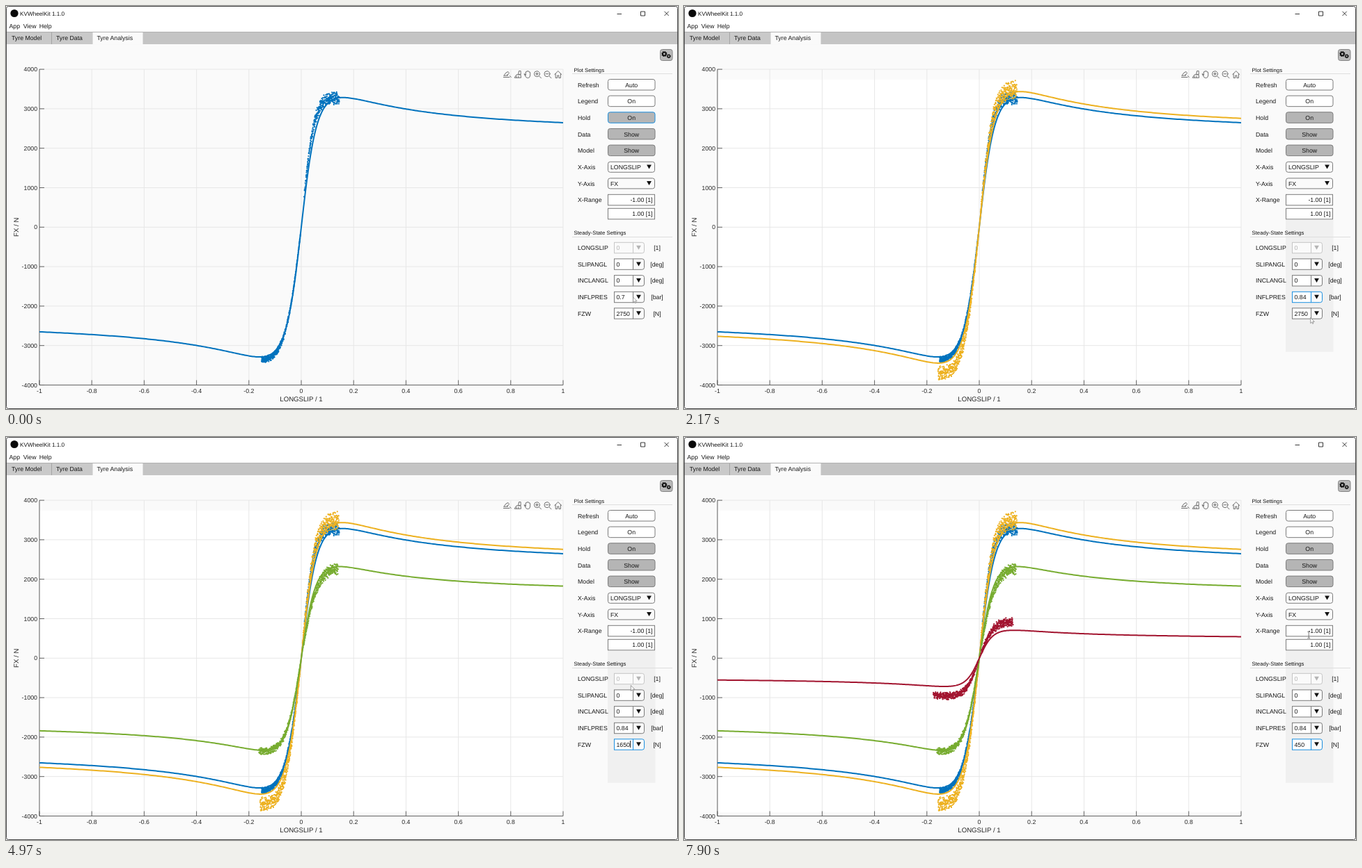
An HTML page that plays this animation: 965x580 px, repeating every 8000 ms.

```html
<!DOCTYPE html>
<html lang="en">
<head>
<meta charset="utf-8">
<title>Tyre Analysis</title>
<style>
html, body { margin: 0; width: 100%; height: 100%; overflow: hidden; background: #fafafa; }
svg { display: block; width: 965px; height: 580px; }
text { font: 8.75px "Liberation Sans", Arial, sans-serif; fill: #161616; text-rendering: geometricPrecision; white-space: pre; }
.mid { text-anchor: middle; }
.end { text-anchor: end; }
.axis { font-size: 9.63px; }
.head { font-size: 7.75px; }
.tick { fill: #262626; }
.off { fill: #b4b4b4; }
.line { fill: none; stroke-width: 2; stroke-linejoin: round; }
.dots { fill: none; stroke-width: 2.2; stroke-linecap: round; }
.icon { fill: none; stroke: #6e6e6e; stroke-width: 1; stroke-linejoin: round; stroke-linecap: round; }
.box { stroke: #7b7b7b; stroke-width: 1; fill: #fff; }
.box.on { fill: #b5b5b5; }
.box.soft { fill: #fafafa; }
.box.dim { stroke: #c6c6c6; fill: #fafafa; }
.box.focus { stroke: #1a8fe0; }
</style>
</head>
<body>
<svg id="stage" viewBox="0 0 965 580" xmlns="http://www.w3.org/2000/svg"></svg>
<script>
const LOOP = 8000;
const ACCENT = '#1a8fe0';

// ---------- markup helpers ----------
const text = (x, y, s, cls = '', more = '') =>
  `<text x="${x}" y="${y + 3.1}" class="${cls}" ${more}>${s}</text>`;
const rect = (x, y, w, h, more = '') =>
  `<rect x="${x}" y="${y}" width="${w}" height="${h}" ${more}/>`;
const path = (d, more = '') => `<path d="${d}" ${more}/>`;
const hair = (x1, y1, x2, y2, c) => path(`M${x1} ${y1}L${x2} ${y2}`, `stroke="${c}"`);
const arrow = (x, y, c = '#111') => path(`M${x - 3.4} ${y - 3}h6.8l-3.4 6z`, `fill="${c}"`);

// ---------- window frame ----------
function chrome() {
  return rect(0, 0, 965, 37.5, 'fill="#fff"')
    + `<circle cx="12" cy="10.5" r="5.6" fill="#0a0a0a"/>`
    + text(20, 11, 'KVWheelKit 1.1.0', '', 'style="font-size:8.2px"')
    + path('M877.5 11.5h6.5M911.5 8h6v6h-6zM945.5 7.8l6.2 6.2M951.7 7.8l-6.2 6.2', 'fill="none" stroke="#222" stroke-width=".9"')
    + text(4.5, 29.3, 'App') + text(24.7, 29.3, 'View') + text(47.7, 29.3, 'Help')
    + rect(0, 37.5, 965, 17.5, 'fill="#c4c4c4"')
    + rect(1, 38.5, 123, 16.5, 'fill="#c9c9c9"')
    + hair(0, 37.5, 965, 37.5, '#b2b2b2') + hair(65.5, 38, 65.5, 55, '#a4a4a4')
    + rect(124.5, 38, 72, 17.5, 'fill="#fafafa"')
    + text(8, 46, 'Tyre Model') + text(72, 46, 'Tyre Data') + text(130.5, 46, 'Tyre Analysis');
}

const gear = (x, y, r) =>
  `<circle cx="${x}" cy="${y}" r="${r}" fill="none" stroke="#111" stroke-width="${r * 0.8}"/>`
  + `<circle cx="${x}" cy="${y}" r="${r * 1.45}" fill="none" stroke="#111" stroke-width="${r * 0.5}" stroke-dasharray="${r * 0.57}"/>`;

function toolbar() {
  const lens = x => `<circle cx="${x}" cy="97.7" r="4"/><path d="M${x + 3} 100.8l3 3M${x - 2} 97.7h4"/>`;
  return `<g class="icon">
    <path d="M714.5 102.5h8.5M715 100l3-4 3-1.5 1.5 2-2.5 3.2zM720 98.5v2M723.5 100.5l1.8 2"/>
    <path d="M737 93.5h2.2v5h-3.2zM733.5 98.8h5.5l.6 4.4h-9zM733 101v2M736 101v2"/>
    <path d="M746.3 99.5v-4.6q.9-1 1.6 0v-1q.9-1 1.6 0v.3q.9-1 1.6 0v1q1-.8 1.6.2v4.6q-.4 3.6-3.2 3.6-2.6 0-3.6-2.5l-1.9-3.3q.6-1.2 2.3 1.7z"/>
    ${lens(762.5)}<path d="M762.5 95.7v4"/>
    ${lens(777)}
    <path d="M787.7 98.6l5.1-5 5.1 5M789.2 97.5v6h2.5v-3.5h2.2v3.5h2.5v-6"/>
  </g>`
    + rect(939.5, 62.5, 17.5, 16, 'rx="3" fill="#b9b9b9" stroke="#858585"')
    + gear(945.3, 69, 2.4) + gear(951.7, 72.2, 1.8);
}

// ---------- plot ----------
const px = v => 424 + 376 * v;
const py = v => 318.3 - 0.0568 * v;

function axes() {
  let s = rect(48, 106, 752, 434, 'id="sheet" fill="#fff"'), ticks = '';
  for (let i = -5; i <= 5; i++) {
    const x = px(i / 5);
    s += hair(x, 91, x, 545.5, '#e7e7e7') + text(x, 554.3, i / 5, 'mid tick');
    ticks += `M${x} 545.5v-7`;
  }
  for (let v = -4000; v <= 4000; v += 1000) {
    const y = py(v);
    s += hair(48, y, 800, y, '#e7e7e7') + text(45, y, v, 'end tick');
    ticks += `M48 ${y}h7`;
  }
  return s + path(`M48 91V545.5H800${ticks}`, 'fill="none" stroke="#555" stroke-width=".9"')
    + text(424, 566.3, 'LONGSLIP / 1', 'mid axis tick')
    + text(0, 0, 'FX / N', 'mid axis tick', 'transform="translate(15 318.3) rotate(-90)"');
}

// Magic formula: peak D, stiffness B, shape C, curvature E
function tyre(x, D, B, C, E = 0) {
  const z = B * x;
  return D * Math.sin(C * Math.atan(z - E * (z - Math.atan(z))));
}

function random(seed) {
  return () => (seed = (seed * 16807) % 2147483647) / 2147483647;
}

function curve({ color, D, B, C, shift }) {
  let d = '';
  for (let i = 0; i <= 400; i++) {
    const x = Math.sign(i - 200) * ((i - 200) / 200) ** 2;
    d += `${i ? 'L' : 'M'}${px(x).toFixed(2)} ${py(tyre(x, D, B, C, 0.2) + shift).toFixed(2)}`;
  }
  return path(d, `class="line" stroke="${color}"`);
}

// One measured sweep: from, to, peak, stiffness, spread
function sweep(color, [from, to, D, B, spread], rnd) {
  const n = Math.round(Math.abs(to - from) * 2600);
  let d = '';
  for (let i = 0; i < n; i++) {
    const x = from + (to - from) * i / n + (rnd() - 0.5) * 0.003;
    const grow = Math.min(1, 0.35 + Math.abs(x) / 0.09);
    const noise = spread * grow * (0.5 * Math.sin(i * 0.62) + rnd() - 0.5);
    d += `M${px(x).toFixed(1)} ${py(tyre(x, D, B, 1.5) + noise).toFixed(1)}h0`;
  }
  return path(d, `class="dots" stroke="${color}"`);
}

const runs = [
  { at: 0, color: '#0072bd', D: 3286, B: 11.85, C: 1.5, shift: -2,
    data: [[0.012, 0.145, 3270, 14.5, 165], [-0.152, -0.003, 3360, 11.2, 85]] },
  { at: 1720, color: '#edb120', D: 3440, B: 12, C: 1.503, shift: -4,
    data: [[0.004, 0.143, 3470, 13.5, 250], [-0.157, -0.003, 3700, 11.8, 190]] },
  { at: 4150, color: '#77ac30', D: 2328, B: 12.54, C: 1.516, shift: -7,
    data: [[0.008, 0.141, 2270, 11.3, 150], [-0.161, -0.004, 2355, 12, 95]] },
  { at: 7600, color: '#a2142f', D: 712, B: 13.57, C: 1.527, shift: -5,
    data: [[0.008, 0.128, 915, 13.3, 120], [-0.175, -0.004, 955, 14, 95]] }
];

const plots = () => runs.map((r, i) => {
  const rnd = random(91 + i * 577);
  return `<g id="run${i}">${r.data.map(d => sweep(r.color, d, rnd)).join('')}${curve(r)}</g>`;
}).join('');

// ---------- side panel ----------
const row = i => 113.5 + i * 23.65;

function button(i, label, caption, on, id = '') {
  return text(821, row(i), label)
    + rect(864.5, row(i) - 8, 67.5, 15.5, `rx="3" class="box${on ? ' on' : ''}" ${id && `id="${id}"`}`)
    + text(898.2, row(i), caption, 'mid');
}

function choice(i, label, value) {
  return text(821, row(i), label)
    + rect(864.5, row(i) - 7.5, 67, 15, 'rx="3" class="box soft"')
    + text(868, row(i), value) + arrow(923.5, row(i) - 0.3);
}

const field = (y, value) => rect(864.5, y - 8, 67, 15.5, 'class="box"') + text(928.5, y, value, 'end');

function combo(y, label, value, unit, id, dim) {
  const cls = dim ? 'box dim' : 'box';
  return text(821, y, label)
    + `<g id="${id}" class="${cls}" style="fill:none">`
    + rect(873.5, y - 7.7, 27, 15.4, `fill="${dim ? '#fafafa' : '#fff'}"`)
    + path(`M900.5 ${y - 7.7}h13a3 3 0 0 1 3 3v9.4a3 3 0 0 1 -3 3h-13z`, 'fill="#fafafa"')
    + '</g>'
    + text(876.5, y, value, dim ? 'off' : '', `id="${id}Value"`)
    + arrow(908.5, y - 0.2, dim ? '#b4b4b4' : '#111')
    + text(935, y, unit, 'mid');
}

function panel() {
  return rect(864, 308, 68.5, 189.7, 'id="shade" fill="#f0f0f0"')
    + text(815.5, 91.8, 'Plot Settings', 'head') + hair(813, 97.5, 957, 97.5, '#dedede')
    + button(0, 'Refresh', 'Auto') + button(1, 'Legend', 'On')
    + button(2, 'Hold', 'On', true, 'hold')
    + button(3, 'Data', 'Show', true) + button(4, 'Model', 'Show', true)
    + choice(5, 'X-Axis', 'LONGSLIP') + choice(6, 'Y-Axis', 'FX')
    + text(821, 278.8, 'X-Range') + field(279.3, '-1.00 [1]') + field(299.3, '1.00 [1]')
    + text(815.5, 326, 'Steady-State Settings', 'head') + hair(813, 332.5, 957, 332.5, '#dedede')
    + combo(348, 'LONGSLIP', '0', '[1]', 'slip', true)
    + combo(371.6, 'SLIPANGL', '0', '[deg]', 'angle')
    + combo(395.3, 'INCLANGL', '0', '[deg]', 'incline')
    + combo(419, 'INFLPRES', '0.7', '[bar]', 'pres')
    + combo(442.5, 'FZW', '2750', '[N]', 'load')
    + path('', 'id="caret" stroke="#111" stroke-width=".9"');
}

// ---------- drop-down lists ----------
const PITCH = 17.35;
const lists = {
  pres: { top: 428, items: ['0.7', '0.84', '0.97', '0.98'] },
  load: { top: 277.3, items: [450, 500, 550, 1100, 1650, 2150, 2200, 2700, 2750] }
};

function popup(id) {
  const { top, items } = lists[id];
  return `<g id="${id}List">`
    + rect(873.5, top, 43, items.length * PITCH, 'fill="#fff" stroke="#8a8a8a"')
    + rect(874, top, 42, PITCH, `id="${id}Pick" fill="#a5dbff"`)
    + rect(874, top, 42, PITCH - 0.6, `id="${id}Hover" fill="#dcf0fd" stroke="${ACCENT}"`)
    + items.map((v, i) => text(878, top + PITCH * (i + 0.5), v)).join('') + '</g>';
}

const pointers =
  path('M0 0V8L1.9 6.2 3 8.7 4.2 8.2 3.1 5.7H5.6Z', 'id="mouse" fill="#fff" stroke="#777" stroke-width=".7"')
  + path('M895.3 280.3h1.2l.7.5.7-.5h1.2M895.3 289.7h1.2l.7-.5.7.5h1.2M897.2 280.8v8.4', 'id="beam" fill="none" stroke="#555" stroke-width=".8"');

const stage = document.getElementById('stage');
stage.innerHTML = rect(0, 0, 965, 580, 'fill="#fafafa"') + chrome() + axes() + plots() + toolbar()
  + panel() + popup('pres') + popup('load')
  + rect(0.5, 0.5, 964, 579, 'rx="3" fill="none" stroke="#444"') + pointers;

// ---------- motion ----------
const trail = [ // time, x, y
  [0, 900.5, 419], [60, 900.5, 419], [260, 905, 421], [480, 905, 421], [780, 895, 474],
  [880, 895, 474], [960, 894, 488], [1075, 892.3, 461], [1120, 892, 460], [1230, 892, 452],
  [2020, 892, 452], [2330, 908, 445], [2750, 908, 445], [2980, 899.5, 384.5], [3360, 897.3, 357.5],
  [5400, 897.3, 357.5], [5580, 909.5, 446], [5740, 909.5, 446], [6260, 899.5, 317.5],
  [6400, 899.5, 317.5], [6440, 898.5, 315.5], [6740, 898.5, 315.5], [6770, 897.6, 311],
  [7060, 896.5, 282.5], [LOOP, 896.5, 282.5]
];

function pointer(t) {
  const i = Math.max(1, trail.findIndex(k => k[0] > t));
  const [a, b] = [trail[i - 1], trail[i]];
  const u = Math.max(0, (t - a[0]) / (b[0] - a[0]));
  const s = u * u * (3 - 2 * u);
  return [a[1] + (b[1] - a[1]) * s, a[2] + (b[2] - a[2]) * s];
}

const el = id => document.getElementById(id);
const show = (id, on) => { el(id).style.display = on ? '' : 'none'; };
const within = (t, spans) => spans.some(([a, b]) => t >= a && t < b);
const focus = (id, on) => el(id).classList.toggle('focus', on);

const open = { pres: [[330, 1410]], load: [[2400, 3970], [5740, 7350]] };
const blink = [[1410, 1810], [3970, 4500], [4970, 6000], [7350, 7900]];

function drawList(id, t, value) {
  const shown = within(t, open[id]);
  show(id + 'List', shown);
  if (!shown) return;
  const { top, items } = lists[id];
  const place = (part, i) => el(id + part).setAttribute('y', top + i * PITCH + (part === 'Hover' ? 0.3 : 0));
  const over = Math.floor((pointer(t - 40)[1] - top) / PITCH);
  const picked = items.indexOf(value);
  place('Pick', picked);
  place('Hover', over);
  show(id + 'Hover', over >= 0 && over < items.length && over !== picked);
}

function draw(t) {
  const pres = t < 1410 ? '0.7' : '0.84';
  const load = t < 3970 ? 2750 : t < 7350 ? 1650 : 450;
  const active = t < 330 ? 'hold' : t < 2400 ? 'pres' : 'load';

  runs.forEach((r, i) => show('run' + i, t >= r.at));
  show('sheet', t >= runs[1].at);
  show('shade', t >= 330);
  ['hold', 'pres', 'load'].forEach(id => focus(id, id === active));
  el('presValue').textContent = pres;
  el('loadValue').textContent = load;
  drawList('pres', t, pres);
  drawList('load', t, load);

  const caret = active === 'pres' ? [894.5, 414] : [load === 450 ? 891.5 : 896.5, 437];
  el('caret').setAttribute('d', `M${caret[0]} ${caret[1]}v10`);
  show('caret', within(t, blink));

  el('mouse').setAttribute('transform', `translate(${pointer(t)})`);
  show('mouse', t < 7350);
  show('beam', t >= 7350);
}

const start = performance.now();
function frame() {
  draw((performance.now() - start) % LOOP);
  requestAnimationFrame(frame);
}
frame();
</script>
</body>
</html>
```
